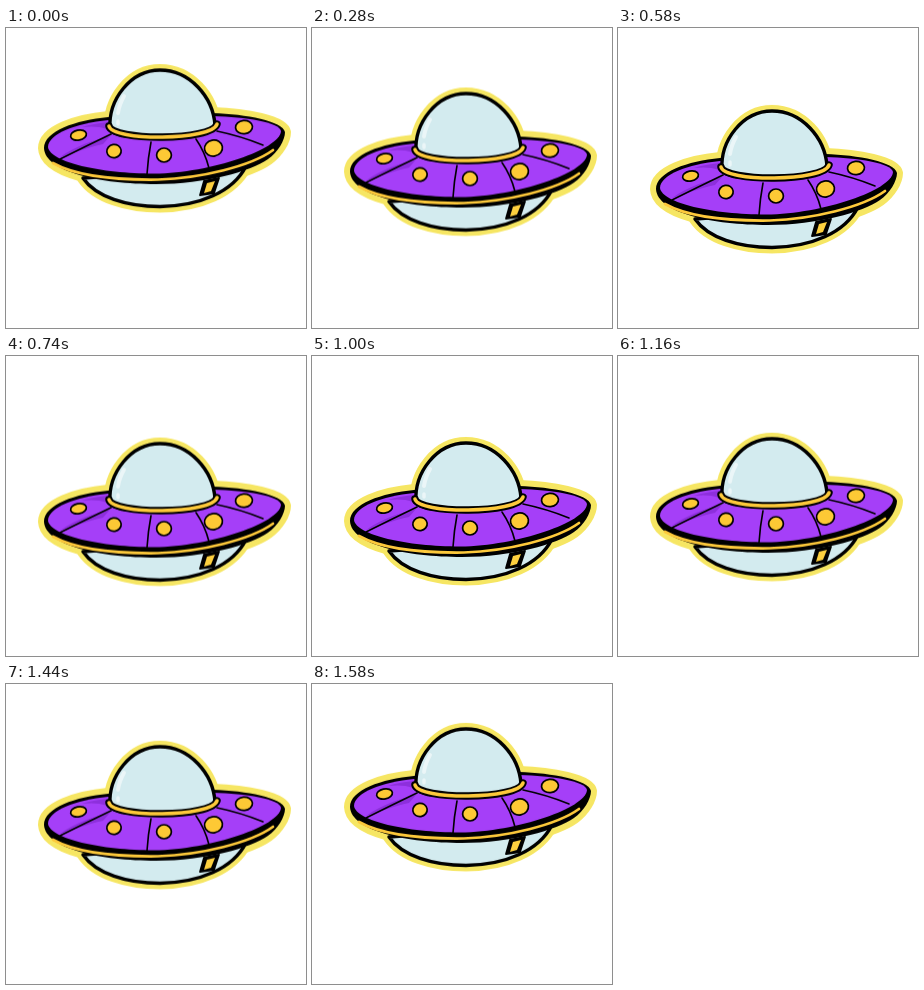
Recreate the animation shown at these times as an HTML page. Size 300x300 px, loop 1.6 s.

```html
<!DOCTYPE html>
<html lang="en">
<head>
<meta charset="utf-8">
<title>Hovering saucer</title>
<style>
  html, body { margin: 0; width: 100%; height: 100%; overflow: hidden; background: #fff; }
  svg { display: block; width: 100vw; height: 100vh; }
  #ship { will-change: transform; }
  .glow { fill: #f6e663; stroke: #f6e663; stroke-width: 12; stroke-linejoin: round; }
  .glass { fill: #d3ebef; stroke: #000; stroke-width: 3.4; stroke-linejoin: round; }
  .line { fill: none; stroke: #000; stroke-linecap: round; }
  .trim { fill: none; stroke: #fdc93b; stroke-linecap: round; }
  .shine { fill: none; stroke: #fff; stroke-linecap: round; opacity: .55; }
  #lights { fill: #fdc935; stroke: #000; stroke-width: 1.7; }
</style>
</head>
<body>
<svg viewBox="0 0 300 300">
  <defs>
    <path id="dome" d="M104 101C102 71 125 42 154 42C184 42 207 69 209 97C206 113 106 114 104 101Z"/>
    <path id="hull" d="M102 89C70 92 38 103 38 120C39 144 95 156 150 156C200 156 245 143 262 131C272 124 279 112 279 104C277 93 240 86 207 85Z"/>
    <path id="belly" d="M77 150C90 169 121 178.500 154 178.500C193 178 227 164 240 138Z"/>
  </defs>
  <g id="ship">
    <g class="glow">
      <use href="#belly"/><use href="#hull"/><use href="#dome"/>
    </g>

    <use href="#belly" class="glass"/>
    <path d="M198 153L213 150L208 165L194 167Z" stroke="#000" stroke-width="1.800" stroke-linejoin="round"/>
    <path d="M201 155L209 153L205 163L198 165Z" fill="#fdd03f"/>

    <use href="#hull"/>
    <path d="M102 92C70 95 42 106 42 119C44 134 95 145.500 148 145.500C205 145 274 121 275 103C273 94 240 89 207 88Z" fill="#a53ff8"/>
    <path d="M54 129C71 117 88 112 104 108L97 116C82 119 67 125 54 129Z" fill="#8d2fdc"/>
    <path d="M76 99C85 96 94 95 102 94V101C93 98 84 98 76 99Z" fill="#8d2fdc"/>
    <path class="trim" stroke-width="2.700" d="M47 135C72 149 113 152 152 151.500C195 150 245 138 267 122"/>
    <path class="line" stroke-width="1.600" d="M105 106Q78 119 54 131M145 114Q142 130 141 146M190 111Q199 124 203 140M211 103Q235 108 257 117"/>
    <g id="lights"></g>

    <use href="#dome" class="glass"/>
    <path class="line" stroke-width="7.500" d="M103 98C106 113 206 113 211 96"/>
    <path class="trim" stroke-width="3.600" d="M103 98C106 113 206 113 211 96"/>
    <path class="shine" stroke-width="4" d="M118 68Q113 77 112 85"/>
    <path class="shine" stroke-width="3.500" d="M112 93L112 96"/>
  </g>
</svg>
<script>
  // cx, cy, rx, ry, tilt
  const lights = [
    [72.5, 107, 8, 5, -12],
    [108, 123, 7.2, 6.6, -8],
    [158, 127, 7.4, 7, 0],
    [207.500, 120, 9, 8, -10],
    [238, 99, 8.5, 6.6, -6]
  ];
  document.getElementById('lights').innerHTML = lights.map(([x, y, rx, ry, tilt]) =>
    `<ellipse rx="${rx}" ry="${ry}" transform="translate(${x} ${y}) rotate(${tilt})"/>`).join('');

  // Sink with a soft stop, then rise with growing speed.
  const at = y => `translate(0px, ${y}px)`;
  document.getElementById('ship').animate([
    { transform: at(0), easing: 'ease-out' },
    { transform: at(46), easing: 'cubic-bezier(.28, 0, .63, 0)' },
    { transform: at(0) }
  ], { duration: 1600, iterations: Infinity });
</script>
</body>
</html>
```
